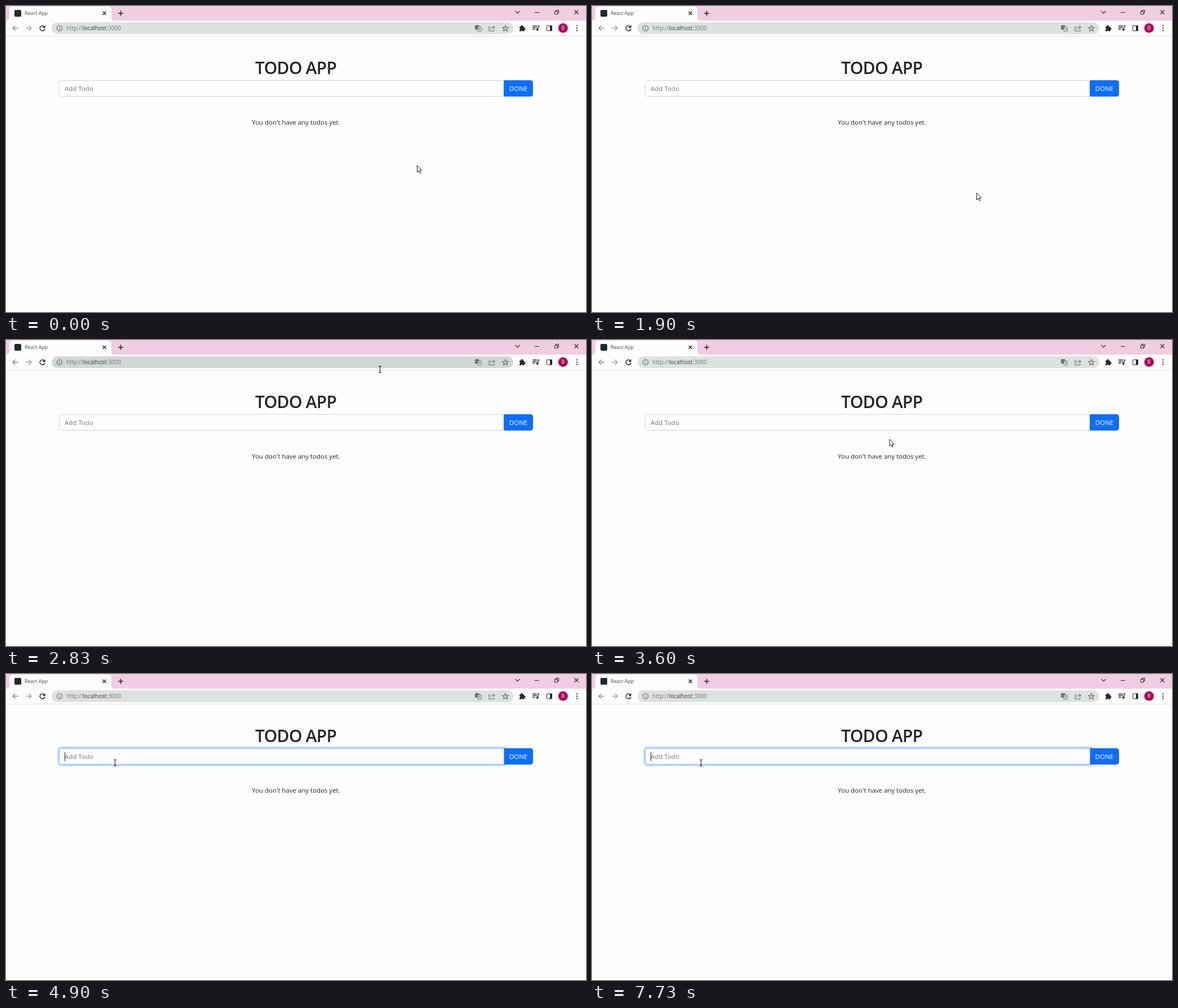
These frames come from a looping animation (1029x544 px, 8000 ms). An HTML page with a canvas:

```html
<!DOCTYPE html>
<html lang="en">
<head>
<meta charset="utf-8">
<title>Todo app</title>
<style>
  html, body { margin: 0; width: 100%; height: 100%; overflow: hidden; background: #fdfdfc; }
  canvas { display: block; width: 1029px; height: 544px; }
</style>
</head>
<body>
<canvas id="stage"></canvas>
<script>
const W = 1029, H = 544, LOOP = 8000;
const FONT = '"Open Sans", "Noto Sans", sans-serif';
const canvas = document.getElementById('stage');
const ctx = canvas.getContext('2d');
const dpr = window.devicePixelRatio || 1;
canvas.width = W * dpr;
canvas.height = H * dpr;

// Pointer path: time, x, y
const PATH = [
  [0, 729, 283], [360, 729, 283], [630, 724, 283], [1160, 688, 324],
  [1400, 682, 332], [1900, 682, 332], [2060, 684, 371], [2260, 684, 371],
  [2690, 668, 41], [2830, 663, 52], [3000, 655, 75], [3360, 655, 75],
  [3600, 528, 176], [3850, 300, 167], [4100, 193, 158], [LOOP, 193, 158]
];
const FOCUS = 4380, BLINK_FROM = 4545, BLINK = 530;

const ramp = (t, a, b) => Math.min(1, Math.max(0, (t - a) / (b - a)));

function slope(i, axis) {
  if (i <= 0 || i >= PATH.length - 1) return 0;
  const [p, q, r] = [PATH[i - 1], PATH[i], PATH[i + 1]];
  const a = (q[axis] - p[axis]) / (q[0] - p[0]);
  const b = (r[axis] - q[axis]) / (r[0] - q[0]);
  return a * b > 0 ? 2 * a * b / (a + b) : 0;
}

function along(t, axis) {
  let i = 0;
  while (i < PATH.length - 2 && t >= PATH[i + 1][0]) i++;
  const p = PATH[i], q = PATH[i + 1], d = q[0] - p[0];
  const u = (t - p[0]) / d, v = 1 - u;
  return v * v * (1 + 2 * u) * p[axis] + u * u * (3 - 2 * u) * q[axis]
    + d * u * v * (v * slope(i, axis) - u * slope(i + 1, axis));
}

function mix(a, b, k) {
  return `rgb(${a.map((v, i) => Math.round(v + (b[i] - v) * k))})`;
}

function rect(x, y, w, h, fill) {
  ctx.fillStyle = fill;
  ctx.fillRect(x, y, w, h);
}

function round(x, y, w, h, r, fill, stroke) {
  ctx.beginPath();
  ctx.roundRect(x, y, w, h, r);
  if (fill) { ctx.fillStyle = fill; ctx.fill(); }
  if (stroke) { ctx.strokeStyle = stroke; ctx.lineWidth = 1; ctx.stroke(); }
}

function dot(x, y, r, fill) {
  ctx.beginPath();
  ctx.arc(x, y, r, 0, 7);
  ctx.fillStyle = fill;
  ctx.fill();
}

function line(d, color, width = 1.2, x = 0, y = 0) {
  ctx.save();
  ctx.translate(x, y);
  ctx.strokeStyle = color;
  ctx.lineWidth = width;
  ctx.stroke(new Path2D(d));
  ctx.restore();
}

function text(s, x, y, size, color, align = 'left', weight = 400, spacing = 0) {
  ctx.font = `${weight} ${size}px ${FONT}`;
  ctx.letterSpacing = spacing + 'px';
  ctx.textAlign = align;
  ctx.fillStyle = color;
  ctx.fillText(s, x, y);
  return ctx.measureText(s).width;
}

function titleBar() {
  rect(0, 0, W, 26, '#f0cde0');
  ctx.fillStyle = '#fdfdfd';
  ctx.fill(new Path2D('M0 26Q6 26 6 20V7Q6 1 12 1H181Q187 1 187 7V20Q187 26 193 26Z'));
  round(15, 7, 12, 12, 2, '#20292e');
  text('React App', 33, 16.2, 8.8, '#45484b');
  line('M-3-3L3 3M3-3L-3 3', '#222', 1.4, 174.5, 13);
  line('M-4.5 0H4.5M0-4.5V4.5', '#222', 1.5, 203.5, 13);
  line('M-4-2L0 2L4-2', '#333', 1.1, 907.5, 11);
  line('M-4 .5H4', '#222', 1, 942, 11);
  line('M-3.5-1.5H1.5V3.5H-3.5ZM-1.5-1.5V-3.5H3.5V1.5H1.5', '#222', 1, 977, 11);
  line('M-3.5-3.5L3.5 3.5M3.5-3.5L-3.5 3.5', '#222', 1.1, 1012, 11);
}

function toolbar(hover) {
  const grey = '#6f7376', dark = '#26292c';
  rect(0, 26, W, 27, '#fdfdfd');
  rect(0, 53, W, 1, '#e0e4d0');
  line('M5 0H-4.5M0-4.5L-4.5 0L0 4.5', '#85888a', 1.3, 16.5, 39.5);
  line('M-5 0H4.5M0-4.5L4.5 0L0 4.5', '#9a9d9f', 1.3, 40.5, 39.5);
  line('M3.2-3A4.4 4.4 0 1 0 4.4 1', dark, 1.5, 64.5, 39.5);
  ctx.fillStyle = dark;
  ctx.fill(new Path2D('M69.5 34V39H64.5Z'));

  round(81, 29, 819, 21, 10.5, mix([222, 226, 222], [211, 215, 212], hover));
  ctx.beginPath();
  ctx.arc(95, 39.5, 4.8, 0, 7);
  ctx.strokeStyle = '#5f6368';
  ctx.lineWidth = 1.1;
  ctx.stroke();
  line('M0-.7V2.6M0-2.6V-1.4', '#5f6368', 1.2, 95, 39.5);
  let x = 107;
  x += text('http://', x, 43, 10.03, '#73777a');
  x += text('localhost', x, 43, 10.03, '#33373a');
  text(':3000', x, 43, 10.03, '#73777a');

  round(832, 34, 7.5, 8, 1, grey);
  round(837, 37, 6.5, 8, 1, '#e4e7e4', grey);
  line('M838.5 39.5H842M840.2 38.5V39.5M841.5 39.5L838.7 43M839 39.5L842 43', grey, .7);
  line('M-2-2.5H-5V5H4V2.5M-2 2Q-1.5-1.5 2-1.5H4.5M2.2-4.3L5-1.5L2.2 1.3', grey, 1.1, 862, 39.5);
  let star = 'M';
  for (let i = 0; i < 10; i++) {
    const r = i % 2 ? 2.3 : 5.5, a = i * Math.PI / 5 - Math.PI / 2;
    star += `${i ? 'L' : ''}${886 + r * Math.cos(a)} ${40 + r * Math.sin(a)}`;
  }
  line(star + 'Z', '#5f6368', 1.1);

  round(911, 36.5, 8.5, 8.5, 1, dark);
  dot(915, 36, 1.9, dark);
  dot(919.7, 40.8, 1.9, dark);
  dot(911, 40.8, 1.3, '#fdfdfd');
  dot(915.2, 45, 1.3, '#fdfdfd');
  line('M-6-3.5H2M-6-.5H2M-6 2.5H-1.5M4 3V-3.5H6.5', dark, 1.3, 940, 39);
  dot(942.7, 42, 1.9, dark);
  round(959.5, 35, 9, 9, 1, null, dark);
  rect(965, 35, 4, 9, dark);
  dot(988.3, 39.3, 8.5, '#ad0559');
  text('B', 988.3, 42.4, 8.3, '#fff', 'center');
  for (const y of [35.3, 39.5, 43.7]) dot(1013, y, 1.15, dark);
}

function form(t) {
  const focus = ramp(t, FOCUS, FOCUS + 160);
  text('TODO APP', 514.2, 120.5, 30, '#212529', 'center', 600, -0.75);
  round(883, 132, 52, 29, [0, 4.5, 4.5, 0], '#0d6efd');
  if (focus > 0) {
    const s = 3.1 * focus;
    ctx.beginPath();
    ctx.roundRect(94 - s, 132 - s, 790 + 2 * s, 29 + 2 * s, [4.5 + s, 0, 0, 4.5 + s]);
    ctx.roundRect(94, 132, 790, 29, [4.5, 0, 0, 4.5]);
    ctx.fillStyle = `rgba(13,110,253,${.25 * focus})`;
    ctx.fill('evenodd');
  }
  round(94.5, 132.5, 789, 28, [4, 0, 0, 4], '#fefefe', mix([206, 212, 218], [134, 183, 254], focus));
  rect(883, 133, 1, 27, mix([13, 110, 253], [134, 183, 254], focus));
  text('Add Todo', 104, 151, 11.5, '#757c82');
  text('DONE', 909, 151, 11.5, '#fff', 'center');
  text("You don't have any todos yet.", 514.5, 211, 11.45, '#212529', 'center');
  const lit = t < BLINK_FROM || Math.floor((t - BLINK_FROM) / BLINK) % 2 === 0;
  if (t >= FOCUS && lit) rect(104, 139, 1, 16, '#222');
}

function pointer(x, y) {
  const inField = x > 94 && x < 883 && y > 132 && y < 161;
  if (inField || y < 53) {
    const beam = 'M-2.5-5.5H-1Q0-5.5 0-4.5Q0-5.5 1-5.5H2.5M0-5V5M-2.5 5.5H-1Q0 5.5 0 4.5Q0 5.5 1 5.5H2.5';
    line(beam, '#222', 1.1, x + .5, y);
    return;
  }
  const arrow = new Path2D('M.5.5V12.5L3.2 10L5.2 14.3L7 13.5L5 9.2H8.8Z');
  ctx.save();
  ctx.translate(x, y);
  ctx.fillStyle = '#fff';
  ctx.fill(arrow);
  ctx.strokeStyle = '#1c1c22';
  ctx.lineWidth = 1;
  ctx.stroke(arrow);
  ctx.restore();
}

function draw(t) {
  ctx.setTransform(dpr, 0, 0, dpr, 0, 0);
  rect(0, 0, W, H, '#fdfdfc');
  titleBar();
  toolbar(ramp(t, 2640, 2730) - ramp(t, 2860, 2960));
  form(t);
  pointer(along(t, 1), along(t, 2));
}

const start = performance.now();
function tick() {
  draw((performance.now() - start) % LOOP);
  requestAnimationFrame(tick);
}
tick();
</script>
</body>
</html>
```
